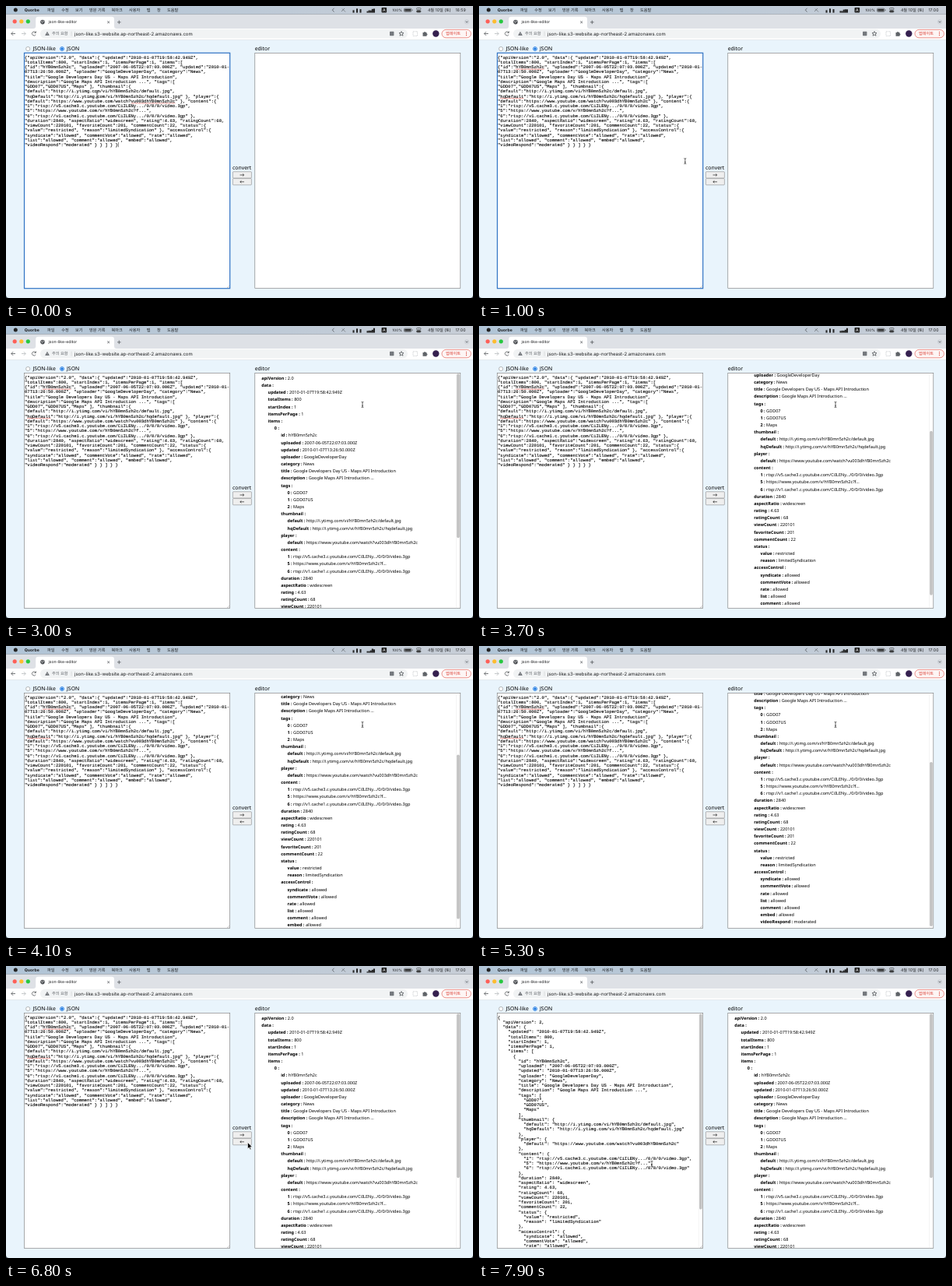
Recreate the animation shown at these times as an HTML page. Size 600x375 px, loop 8 s.

```html
<!DOCTYPE html>
<html lang="ko">
<head>
<meta charset="utf-8">
<title>json-like-editor</title>
<style>
  html, body { margin: 0; width: 100%; height: 100%; overflow: hidden; }
  #stage { display: block; width: 100vw; height: 100vh; }
  text { white-space: pre; text-rendering: geometricPrecision; }
  .ui { font: 5.2px Inter, "Noto Sans CJK KR", "Noto Sans CJK", sans-serif; fill: #1b1c1e; }
  .label { font: 6.85px "Noto Sans", sans-serif; }
  .code { font: 5.556px "Liberation Mono", monospace; stroke: #000; stroke-width: .1; }
  .tree { font: 5.53px "Noto Sans", sans-serif; }
  .line { fill: none; stroke: #55585c; stroke-width: .8; }
  .button { stroke: #767676; stroke-width: .5; }
  .pane { fill: #fff; }
</style>
</head>
<body>
<svg id="stage" viewBox="0 0 600 375">
  <linearGradient id="sky"><stop stop-color="#b0c4d6"/><stop offset="1" stop-color="#c8ced7"/></linearGradient>
  <rect width="600" height="375" fill="#39424d"/>
  <rect y="20" width="600" height="355" rx="4" fill="#e9f4fc"/>

  <!-- menu bar -->
  <rect width="600" height="10.5" fill="url(#sky)"/>
  <circle cx="12.3" cy="5" r="2.5" fill="#222"/>
  <g class="ui" id="menu"></g>
  <g class="line">
    <path d="M421.5 2.8l-2.2 2.4 2.2 2.4"/>
    <path d="M431 7l4-4M432 3.5l4 4" style="stroke-width:.6"/>
    <rect x="511.5" y="3.2" width="9.4" height="4.2" rx="1"/>
    <path d="M522 4.5v1.6"/>
    <rect x="527.5" y="2.5" width="5.5" height="2.3" rx="1.1"/>
    <rect x="527.5" y="5.8" width="5.5" height="2.3" rx="1.1" fill="#333"/>
  </g>
  <rect x="512.3" y="4" width="7.8" height="2.6" fill="#333"/>
  <g id="meter" fill="#222"></g>
  <rect x="482.5" y="2" width="6.6" height="6.6" rx="1" fill="#222"/>
  <text class="ui" x="484.1" y="7.1" style="fill:#fff">A</text>
  <text class="ui" x="496.5" y="7" style="font-size:4.6px">100%</text>

  <!-- tabs -->
  <rect y="10.5" width="600" height="18.5" fill="#dee1e6"/>
  <circle cx="11.2" cy="19.8" r="2.6" fill="#ff5f57"/>
  <circle cx="19.8" cy="19.8" r="2.6" fill="#febc2e"/>
  <circle cx="28.3" cy="19.8" r="2.6" fill="#28c840"/>
  <path d="M35 29q3.2 0 3.2-3.2V17q0-3.2 3.2-3.2h94.4q3.2 0 3.2 3.2v8.8q0 3.2 3.2 3.2Z" fill="#fff"/>
  <circle cx="47" cy="20.6" r="2.8" fill="#4a4d51"/>
  <path d="M45 19.4l1.8.8-.6 1.9M47.6 18.5l.4 1.3 1.3.6" stroke="#fff" stroke-width=".6" fill="none"/>
  <text class="ui" x="54.5" y="22.4" style="font-size:5.1px">json-like-editor</text>
  <path class="line" d="M130.2 19.4l2.8 2.8m0-2.8l-2.8 2.8M143 20.8h4.6m-2.3-2.3v4.6"/>
  <circle cx="592" cy="20.3" r="3.1" fill="#cfd3d9"/>
  <path d="M590.6 19.7l1.4 1.4 1.4-1.4" stroke="#44474b" stroke-width=".7" fill="none"/>

  <!-- toolbar -->
  <rect y="29" width="600" height="14.3" fill="#fff"/>
  <rect y="43" width="600" height=".5" fill="#d5d9dd"/>
  <rect x="44" y="29.8" width="472" height="11.6" rx="5.8" fill="#f1f3f4"/>
  <path class="line" d="M12 35.5H6.8m2.4-2.4l-2.4 2.4 2.4 2.4M38 34a2.5 2.5 0 1 0 .2 2.6M38.4 32.4v2h-2"/>
  <path class="line" d="M20 35.5h5.2m-2.4-2.4l2.4 2.4-2.4 2.4" style="stroke:#b7babd"/>
  <path d="M53 32.8l2.8 5h-5.6Z" fill="#5f6368"/>
  <path d="M53 34.5v1.5m0 .4v.6" stroke="#fff" stroke-width=".6"/>
  <text class="ui" x="59" y="37.4" style="fill:#5f6368">주의 요함</text>
  <path d="M84 32.6v6" stroke="#c4c7ca" stroke-width=".5"/>
  <text class="ui" x="88" y="37.6" style="font-size:6px">json-like.s3-website.ap-northeast-2.amazonaws.com</text>
  <rect x="493" y="32.8" width="5.4" height="5.4" rx=".6" fill="#74787d"/>
  <path class="line" stroke-linejoin="round" d="M508 32.6l.9 2h2.1l-1.7 1.4.7 2.2-2-1.3-2 1.3.7-2.2-1.7-1.4h2.1Z"/>
  <rect class="line" x="523" y="32.8" width="5.6" height="5.6" stroke-dasharray="1 1" style="stroke:#b8bbbf"/>
  <path d="M535.5 34h1.6a1 1 0 0 1 2 0h1.4v1.6a1 1 0 0 1 0 2v1.2h-5Z" fill="#5f6368"/>
  <circle cx="552.3" cy="35.5" r="4.2" fill="#35204f"/>
  <rect x="560" y="30.4" width="37.4" height="10.4" rx="5.2" fill="#fdf5f4" stroke="#dd4a3e" stroke-width=".6"/>
  <text class="ui" x="565" y="37.4" font-weight="500" style="fill:#d93025">업데이트</text>
  <g fill="#d93025"><circle cx="591.5" cy="33.6" r=".6"/><circle cx="591.5" cy="35.6" r=".6"/><circle cx="591.5" cy="37.6" r=".6"/></g>

  <!-- page -->
  <circle cx="28.2" cy="55" r="2.6" fill="#fff" stroke="#767676" stroke-width=".5"/>
  <circle cx="72" cy="55" r="2.4" fill="#fff" stroke="#0b6fe0" stroke-width=".9"/>
  <circle cx="72" cy="55" r="1.5" fill="#0b6fe0"/>
  <g class="label">
    <text x="34.4" y="57.4">JSON-like</text>
    <text x="78" y="57.4">JSON</text>
    <text x="319.7" y="57.4">editor</text>
    <text x="291" y="210">convert</text>
  </g>
  <rect class="button" id="toTree" x="291.4" y="212.8" width="24" height="8.2" rx=".8"/>
  <rect class="button" id="toJson" x="291.4" y="221.6" width="24" height="8.2" rx=".8"/>
  <path class="line" style="stroke:#000;stroke-width:.6" d="M300.5 217h5.2m-1.6-1.4l1.6 1.4-1.6 1.4M306 225.8h-5.2m1.6-1.4l-1.6 1.4 1.6 1.4"/>

  <rect class="pane" id="input" x="23.5" y="60.3" width="264.2" height="302.4"/>
  <svg x="23.5" y="60.5" width="264" height="302" viewBox="23.5 60.5 264 302">
    <g class="code" id="compact"></g>
    <g class="code" id="pretty"></g>
    <path id="misspelt" stroke="#e8524a" stroke-width=".8" stroke-dasharray=".9 .4"/>
    <path id="caret" d="M144.4 175v6.2" stroke="#000" stroke-width=".5"/>
    <g id="inputBar">
      <path d="M282.3 60.5v302" stroke="#e8e8e8" stroke-width=".5"/>
      <rect id="inputThumb" x="283.1" y="61.4" width="3.5" rx="1.7" fill="#c1c1c1"/>
    </g>
    <path d="M284 362l3-3m-1.4 3l1.4-1.4" stroke="#888" stroke-width=".4"/>
  </svg>

  <rect class="pane" x="319.8" y="60.3" width="264" height="302.4" stroke="#767676" stroke-width=".6"/>
  <svg id="editor" x="320" y="60.6" width="263.6" height="301.8" viewBox="320 60.6 263.6 301.8">
    <g class="tree" id="tree"></g>
    <path d="M578.5 60.5v302" stroke="#e8e8e8" stroke-width=".5"/>
    <rect id="thumb" x="579.2" width="3.5" height="211" rx="1.7" fill="#c1c1c1"/>
  </svg>

  <g id="pointer">
    <path id="arrow" d="M0 0V8.3L1.9 6.6 3.2 9.6 4.5 9 3.2 6.1H5.8Z" stroke="#fff" stroke-width=".6"/>
    <path id="beam" d="M-1.4-3.6Q0-3.6 0-2.6V2.6Q0 3.6-1.4 3.6M1.4-3.6Q0-3.6 0-2.6M0 2.6Q0 3.6 1.4 3.6M-.8 1.3h1.6" fill="none" stroke="#111" stroke-width=".65"/>
  </g>
</svg>

<script>
const LOOP = 8000, TREE_AT = 2200, JSON_AT = 7100, PRESS = 250;
const LINE = 6.25, ROW = 9.17, CHAR = 10 / 3, LEFT = 24, COLUMNS = 79;
const $ = id => document.getElementById(id);

const source = '{"apiVersion":"2.0", "data":{ "updated":"2010-01-07T19:58:42.949Z", ' +
  '"totalItems":800, "startIndex":1, "itemsPerPage":1, "items":[ ' +
  '{"id":"hYB0mn5zh2c", "uploaded":"2007-06-05T22:07:03.000Z", "updated":"2010-01-07T13:26:50.000Z", ' +
  '"uploader":"GoogleDeveloperDay", "category":"News", ' +
  '"title":"Google Developers Day US - Maps API Introduction", ' +
  '"description":"Google Maps API Introduction ...", "tags":[ "GDD07","GDD07US","Maps" ], ' +
  '"thumbnail":{ "default":"http://i.ytimg.com/vi/hYB0mn5zh2c/default.jpg", ' +
  '"hqDefault":"http://i.ytimg.com/vi/hYB0mn5zh2c/hqdefault.jpg" }, ' +
  '"player":{ "default":"https://www.youtube.com/watch?vu003dhYB0mn5zh2c" }, ' +
  '"content":{ "1":"rtsp://v5.cache3.c.youtube.com/CiILENy.../0/0/0/video.3gp", ' +
  '"5":"https://www.youtube.com/v/hYB0mn5zh2c?f...", ' +
  '"6":"rtsp://v1.cache1.c.youtube.com/CiILENy.../0/0/0/video.3gp" }, ' +
  '"duration":2840, "aspectRatio":"widescreen", "rating":4.63, "ratingCount":68, ' +
  '"viewCount":220101, "favoriteCount":201, "commentCount":22, ' +
  '"status":{ "value":"restricted", "reason":"limitedSyndication" }, ' +
  '"accessControl":{ "syndicate":"allowed", "commentVote":"allowed", "rate":"allowed", ' +
  '"list":"allowed", "comment":"allowed", "embed":"allowed", "videoRespond":"moderated" } } ] } }';
const data = JSON.parse(source);

const text = (x, y, content, extra = '') => `<text x="${x}" y="${y}" ${extra}>${content}</text>`;

function wrap(string) {
  const lines = [''];
  for (const word of string.split(/(?<=[ -])/)) {
    if (lines.at(-1).length + word.trimEnd().length > COLUMNS) lines.push('');
    lines[lines.length - 1] += word;
  }
  return lines;
}

const codeLines = lines => lines.map((line, i) => text(LEFT, 67.5 + i * LINE, line)).join('');

function treeRows(node, depth = 0) {
  return Object.entries(node).flatMap(([key, value]) => typeof value === 'object'
    ? [{ depth, key, value: '' }, ...treeRows(value, depth + 1)]
    : [{ depth, key, value }]);
}

const compactLines = wrap(source);
const prettyLines = JSON.stringify(data, null, 2).replace('"2.0"', '2').split('\n');
$('compact').innerHTML = codeLines(compactLines);
$('pretty').innerHTML = codeLines(prettyLines);
$('inputThumb').setAttribute('height', 300 * 300 / (prettyLines.length * LINE + 2));
$('tree').innerHTML = treeRows(data).map(({ depth, key, value }, i) =>
  text(328.2 + depth * 8.33, 69 + i * ROW, `<tspan font-weight="700">${key} :</tspan> ${value}`)).join('');

const menu = [['파일', 53], ['수정', 71.3], ['보기', 89], ['방문 기록', 107], ['북마크', 135.5],
  ['사용자', 158], ['탭', 180.7], ['창', 194], ['도움말', 207], ['4월 10일 (토)', 542]];
$('menu').innerHTML = text(23.8, 7, 'Quorbe', 'font-weight="700"') +
  menu.map(([name, x]) => text(x, 7, name)).join('') + text(577.5, 7, '', 'id="clock"');

function underline(row, word) {
  const column = compactLines[row].indexOf(word);
  return `M${LEFT + column * CHAR} ${68.7 + row * LINE}h${word.length * CHAR}`;
}
const firstMarks = underline(9, 'vu003dhYB0mn5zh2c');
const laterMarks = underline(2, 'hYB0mn5zh2c') + underline(8, 'hqDefault');

// Each stop is [time, ...values]
const pointerPath = [[0, 117, 115], [250, 117, 115], [900, 262, 198], [1500, 299.5, 214],
  [2300, 299.5, 214], [2800, 458, 101], [6000, 458, 101], [6600, 310.5, 226.5],
  [7150, 310.5, 226.5], [7700, 222, 254], [LOOP, 222, 254]];
const scrollPath = [[0, 0], [3000, 0], [3600, 102], [3700, 105], [3900, 112], [4100, 112],
  [4900, 125.3], [5300, 125.3], [5950, 0], [LOOP, 0]];

function along(path, t) {
  const i = path.findIndex(stop => stop[0] > t);
  const from = path[i - 1], to = path[i];
  const u = (t - from[0]) / (to[0] - from[0]);
  const eased = u * u * (3 - 2 * u);
  return from.slice(1).map((v, k) => v + (to[k + 1] - v) * eased);
}

const show = (id, visible) => $(id).style.display = visible ? '' : 'none';
const noise = n => Math.abs(Math.sin(n * 12.9898) * 43758.5453) % 1;
const bar = (x, height, width) =>
  `<rect x="${x}" y="${8.6 - height}" width="${width}" height="${height}"/>`;

function render(t) {
  const [x, y] = along(pointerPath, t), [scroll] = along(scrollPath, t);
  const focused = t < TREE_AT, formatted = t >= JSON_AT;
  const overInput = x < 287 && y > 61, overEditor = x > 320;
  const buttonFill = clickAt => t > clickAt - PRESS && t < clickAt ? '#dedede' : '#efefef';

  $('pointer').setAttribute('transform', `translate(${x} ${y})`);
  show('beam', overInput || overEditor);
  show('arrow', !overInput && !overEditor);

  $('input').setAttribute('stroke', focused ? '#2f72c4' : '#767676');
  $('input').setAttribute('stroke-width', focused ? 1.2 : .6);
  show('compact', !formatted);
  show('pretty', formatted);
  show('inputBar', formatted);
  show('misspelt', !formatted);
  $('misspelt').setAttribute('d', t < 1000 ? firstMarks : laterMarks);
  show('caret', focused && t % 1200 < 600);

  show('editor', !focused);
  $('tree').setAttribute('transform', `translate(0 ${-scroll})`);
  $('thumb').setAttribute('y', 61.2 + scroll * .7);
  $('toTree').setAttribute('fill', buttonFill(TREE_AT));
  $('toJson').setAttribute('fill', buttonFill(JSON_AT));

  $('clock').textContent = t < 600 ? '16:59' : '17:00';
  const tick = Math.floor(t / 1000);
  $('meter').innerHTML = [0, 1, 2].map(i => bar(445.5 + i * 4.5, 3 + 4 * noise(i + 2), 2)).join('') +
    [0, 1, 2, 3, 4].map(i => bar(463.5 + i * 2.1, 1 + i * .8 + 2 * noise(i + tick + 5), 2.1)).join('');
}

function frame(now) {
  render(now % LOOP);
  requestAnimationFrame(frame);
}
render(0);
requestAnimationFrame(frame);
</script>
</body>
</html>
```
